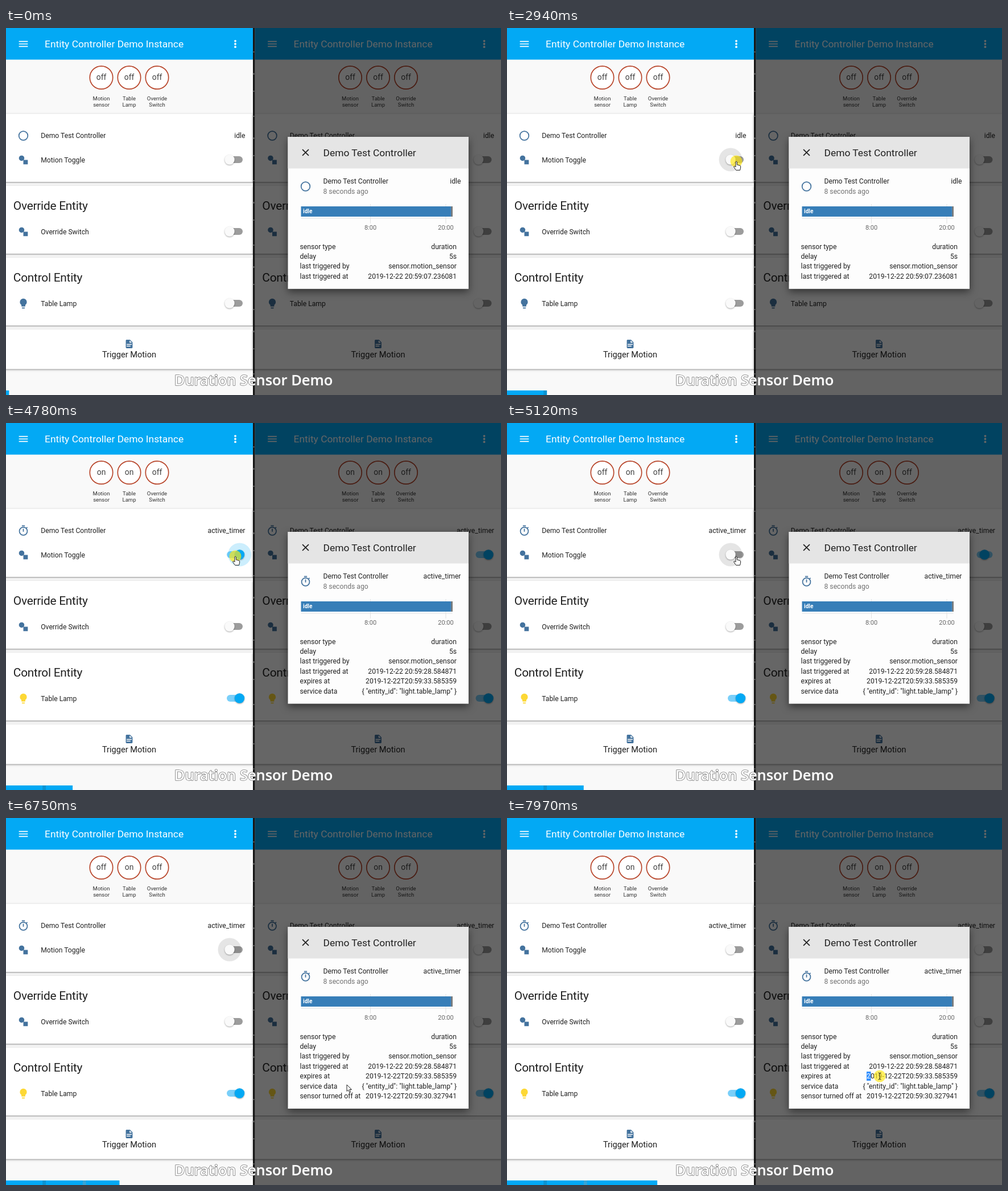
Recreate the animation shown at these times as an HTML page. Size 870 px wide and 644 px high, loop 8000 ms.

```html
<!DOCTYPE html>
<html lang="en">
<head>
<meta charset="utf-8">
<title>Duration Sensor Demo</title>
<style>
html, body { margin: 0; width: 100%; height: 100%; overflow: hidden; background: #f9f9f9; }
svg { display: block; }
text { font-family: Roboto, sans-serif; font-size: 12.18px; fill: #212121; white-space: pre; }
.end { text-anchor: end; }
.mid { text-anchor: middle; }
.title { font-size: 17.4px; }
.bar { fill: #fff; }
.head { font-size: 20.88px; letter-spacing: -.012em; }
.action { font-size: 14.6px; }
.badge { font-size: 13.9px; fill: #444; }
.label { font-size: 9.5px; fill: #333; }
.muted { fill: #727272; }
.tick { font-size: 11px; fill: #666; }
.span { font-size: 10px; font-weight: 700; fill: #fff; }
.card { fill: #fff; filter: drop-shadow(0 1px .8px rgba(0,0,0,.34)) drop-shadow(0 1px 2px rgba(0,0,0,.14)); }
.knob { filter: drop-shadow(0 1px 1px rgba(0,0,0,.35)); }
.dialog { filter: drop-shadow(0 5px 7px rgba(0,0,0,.5)); }
.caption { font: 600 25.4px "Open Sans", sans-serif; fill: #fff; stroke: #777; stroke-width: 1.6px; paint-order: stroke; stroke-linejoin: round; }
</style>
</head>
<body>
<svg id="stage" width="870" height="644" viewBox="0 0 870 644"></svg>
<script>
const LOOP = 8000, BLUE = '#44739e', ACCENT = '#03a9f4';

// Bursts of activity: [first step, start ms, end ms, number of steps]
const bursts = [
  [0, 0, 1, 1], [1, 210, 420, 3], [4, 640, 1300, 7], [11, 2940, 3690, 8],
  [19, 4780, 5450, 7], [26, 5990, 6750, 8], [34, 6850, 7620, 8], [42, 7720, 7970, 3]
];

// Pointer path: [step, x, y]
const path = [
  [1, 722, 534], [3, 607, 428], [6, 490, 312], [9, 404, 236], [10, 403, 234],
  [25, 403, 234], [26, 482, 273], [29, 530, 352], [33, 599, 468],
  [37, 622, 462], [41, 635, 457], [42, 635, 454], [43, 645, 453], [44, 655, 453]
];

const icons = {
  drawing: 'M8.5 3A5.5 5.5 0 0 1 14 8.5C14 9.8 13.5 11 12.7 12H21V21H12V12.7C11 13.5 9.8 14 8.5 14A5.5 5.5 0 0 1 8.5 3Z',
  bulb: 'M12 2A7 7 0 0 0 5 9C5 11.4 6.2 13.5 8 14.7V17A1 1 0 0 0 9 18H15A1 1 0 0 0 16 17V14.7C17.8 13.5 19 11.4 19 9A7 7 0 0 0 12 2M9 21A1 1 0 0 0 10 22H14A1 1 0 0 0 15 21V20H9Z',
  file: 'M13 9H18.5L13 3.5V9M6 2H14L20 8V20A2 2 0 0 1 18 22H6C4.9 22 4 21.1 4 20V4C4 2.9 4.9 2 6 2M15 18V16H6V18H15M18 14V12H6V14H18Z',
  menu: 'M3 6H21V8H3ZM3 11H21V13H3ZM3 16H21V18H3Z',
  close: 'M19 6.4L17.6 5L12 10.6L6.4 5L5 6.4L10.6 12L5 17.6L6.4 19L12 13.4L17.6 19L19 17.6L13.4 12Z'
};

const text = (x, y, s, cls = '') => `<text x="${x}" y="${y}" class="${cls}">${s}</text>`;
const rect = (x, y, w, h, fill, more = '') =>
  `<rect x="${x}" y="${y}" width="${w}" height="${h}" fill="${fill}" ${more}/>`;
const circle = (x, y, r, fill, more = '') => `<circle cx="${x}" cy="${y}" r="${r}" fill="${fill}" ${more}/>`;
const place = (x, y, scale, body) =>
  `<g transform="translate(${x} ${y}) scale(${scale}) translate(-12 -12)">${body}</g>`;
const icon = (name, x, y, fill = BLUE, scale = .87) =>
  place(x, y, scale, `<path d="${icons[name]}" fill="${fill}"/>`);

function stateIcon(x, y, active) {
  const body = active
    ? '<circle cx="12" cy="13" r="8"/><path d="M9 2H15M12 8V14M18 7L20 5"/>'
    : '<circle cx="12" cy="12" r="9"/>';
  return place(x, y, .87, `<g fill="none" stroke="${BLUE}" stroke-width="2">${body}</g>`);
}

function toggle(y, on, ripple = 0) {
  const lit = on > .4, x = 393 + 17.5 * on;
  return rect(388, y - 6.1, 28, 12.2, lit ? '#7acff9' : '#9c9c9c', 'rx="6.1"')
    + (ripple ? circle(x, y, 20.5, lit ? ACCENT : '#000', `opacity="${ripple}"`) : '')
    + circle(x, y, 8.7, lit ? ACCENT : '#fafafa', 'class="knob"');
}

function badge(x, value, line1, line2) {
  return circle(x, 87, 20.2, '#fff', 'stroke="#b8452a" stroke-width="1.7"')
    + text(x, 91.3, value, 'mid badge')
    + text(x, 127, line1, 'mid label') + text(x, 138, line2, 'mid label');
}

const onOff = v => v ? 'on' : 'off';

function panel(s) {
  const card = (y, h) => rect(-4, y, 443, h, '#fff', 'class="card"');
  const dots = [-5.2, 0, 5.2].map(d => circle(403, 28 + d, 1.9, '#fff')).join('');
  return rect(0, 0, 435, 644, '#f9f9f9')
    + rect(0, 0, 435, 55.5, ACCENT) + icon('menu', 30.5, 28, '#fff')
    + text(68, 34, 'Entity Controller Demo Instance', 'title bar') + dots
    + badge(167.5, onOff(s.motion), 'Motion', 'sensor')
    + badge(216.5, onOff(s.lamp), 'Table', 'Lamp')
    + badge(265.5, 'off', 'Override', 'Switch')
    + card(150.5, 119.5) + card(277, 119) + card(403, 119) + card(529, 69.5)
    + stateIcon(30.5, 189, s.active) + text(61.2, 193.3, 'Demo Test Controller')
    + text(420.5, 193.3, s.active ? 'active_timer' : 'idle', 'end')
    + icon('drawing', 30.5, 231.5) + text(61.2, 235.7, 'Motion Toggle') + toggle(231, s.knob, s.ripple)
    + text(12.8, 318.8, 'Override Entity', 'head')
    + icon('drawing', 30.5, 357.5) + text(61.2, 361.6, 'Override Switch') + toggle(357, 0)
    + text(12.8, 444.8, 'Control Entity', 'head')
    + icon('bulb', 30.5, 483.5, s.lamp ? '#fdd835' : BLUE) + text(61.2, 487.6, 'Table Lamp') + toggle(483, s.lamp)
    + icon('file', 216.5, 554.5, BLUE, .74) + text(216.5, 577.5, 'Trigger Motion', 'mid action');
}

function dialog(k, active) {
  const rows = [
    ['sensor type', 'duration'], ['delay', '5s'], ['last triggered by', 'sensor.motion_sensor'],
    ['last triggered at', active ? '2019-12-22 20:59:28.584871' : '2019-12-22 20:59:07.236081']
  ];
  if (active) rows.push(['expires at', '2019-12-22T20:59:33.585359'], ['service data', '{ "entity_id": "light.table_lamp" }']);
  if (k >= 23) rows.push(['sensor turned off at', '2019-12-22T20:59:30.327941']);
  const selected = k >= 43;
  const list = rows.map(([name, value], i) => {
    const y = 387.5 + 17.4 * i;
    const shown = selected && i === 4 ? value.replace('2', '<tspan fill="#fff">2</tspan>') : value;
    return text(516.5, y, name) + text(792, y, shown, 'end');
  }).join('');
  return rect(495.5, 191, 317.5, 197.2 + 17.4 * rows.length, '#fdfdfd', 'class="dialog"')
    + rect(495.5, 191, 317.5, 55.5, '#e5e5e5')
    + icon('close', 526.5, 218.5, '#212121') + text(557.5, 224.8, 'Demo Test Controller', 'title')
    + stateIcon(526.5, 278, active) + text(557.5, 273.2, 'Demo Test Controller')
    + text(799.5, 273.2, active ? 'active_timer' : 'idle', 'end')
    + text(557.5, 290.7, '8 seconds ago', 'muted')
    + rect(640, 309, 1, 34, '#e2e2e2') + rect(772.5, 309, 1, 34, '#e2e2e2')
    + rect(518.5, 333.5, 266, 1, '#e4e4e4')
    + rect(518.5, 313, 264, 18, '#377eb8') + rect(782.5, 313, 2.3, 18, '#666')
    + text(522, 324.5, 'idle', 'span')
    + text(640.5, 353.5, '8:00', 'mid tick') + text(773, 353.5, '20:00', 'mid tick')
    + (selected ? rect(632, 445, 7.5, 16, '#3390ff') : '') + list;
}

function pointer(k) {
  if (k < 1) return '';
  const i = Math.max(1, path.findIndex(p => p[0] >= k));
  const [k0, x0, y0] = path[i - 1], [k1, x1, y1] = path[i];
  const f = (k - k0) / (k1 - k0), x = x0 + (x1 - x0) * f, y = y0 + (y1 - y0) * f;
  const hand = 'M-1 1Q.2-.8 1.4 1V6L6 7.2Q8 7.8 7.7 10L6.6 15.5H-.5L-4.2 10Q-4.2 7.8-2.6 8.6L-1 10Z';
  const arrow = 'M0 0V11.5L2.7 9.2L4.6 13.3L6.6 12.4L4.8 8.5H8.4Z';
  const caret = 'M-2.5-6Q0-6 0-4.5Q0-6 2.5-6M0-4.5V4.5M-2.5 6Q0 6 0 4.5Q0 6 2.5 6';
  const shape = k >= 40 ? caret : k >= 9 && k <= 25 ? hand : arrow;
  const clicked = k === 11 || k === 12 || k === 19 || k === 20 || k >= 42;
  return (clicked ? circle(x, y, 10.5, '#ffe714', 'opacity=".68"') : '')
    + `<path transform="translate(${x} ${y})" d="${shape}" fill="${shape === caret ? 'none' : '#fff'}" stroke="#222" stroke-width="1" stroke-linejoin="round"/>`;
}

function progress(k) {
  const at = n => 5.4 + 5.88 * n;
  const mark = (n, fill) => k > n ? rect(at(n), 636, 5.9, 8, fill) : '';
  return rect(0, 636, at(k), 8, ACCENT) + mark(10, '#0a93d2') + mark(22, '#35a5d8');
}

// Motion switch position, 0 off to 1 on
const motionKnob = k => k < 13 || k > 21 ? 0 : k === 13 ? .6 : k === 21 ? .5 : 1;

function rippleAt(k) {
  if (k < 10 || k >= 42) return 0;
  return k === 10 ? .045 : k < 13 ? .1 : k < 21 ? .2 : .1;
}

function draw(k) {
  const active = k >= 14;
  const lamp = k < 16 ? 0 : k === 16 ? .5 : 1;
  const motion = k >= 13 && k < 22;
  const left = panel({ motion, lamp, active, knob: motionKnob(k), ripple: rippleAt(k) });
  const lag = k === 14 || k === 22 ? .5 : motionKnob(k - 1);
  const right = panel({ motion, lamp, active, knob: lag });
  return left
    + `<g transform="translate(437.5 0)">${right}</g>`
    + rect(437, 0, 433, 644, '#000', 'opacity=".6"')
    + rect(434, 0, 3.2, 644, '#161616')
    + '<path d="M435.5 41V644" stroke="#777" stroke-width="1.5" stroke-dasharray="2 36 3 28 2 42"/>'
    + dialog(k, active) + progress(k)
    + text(435, 627, 'Duration Sensor Demo', 'mid caption') + pointer(k);
}

function stepAt(t) {
  const [first, start, end, count] = bursts.filter(b => t >= b[1]).pop();
  if (count === 1) return first;
  return first + Math.min(count - 1, Math.floor((t - start) * (count - 1) / (end - start) + 1e-6));
}

const stage = document.getElementById('stage');
let shown = -1;
function tick() {
  const k = stepAt(performance.now() % LOOP);
  if (k !== shown) stage.innerHTML = draw(shown = k);
  requestAnimationFrame(tick);
}
tick();
</script>
</body>
</html>
```
